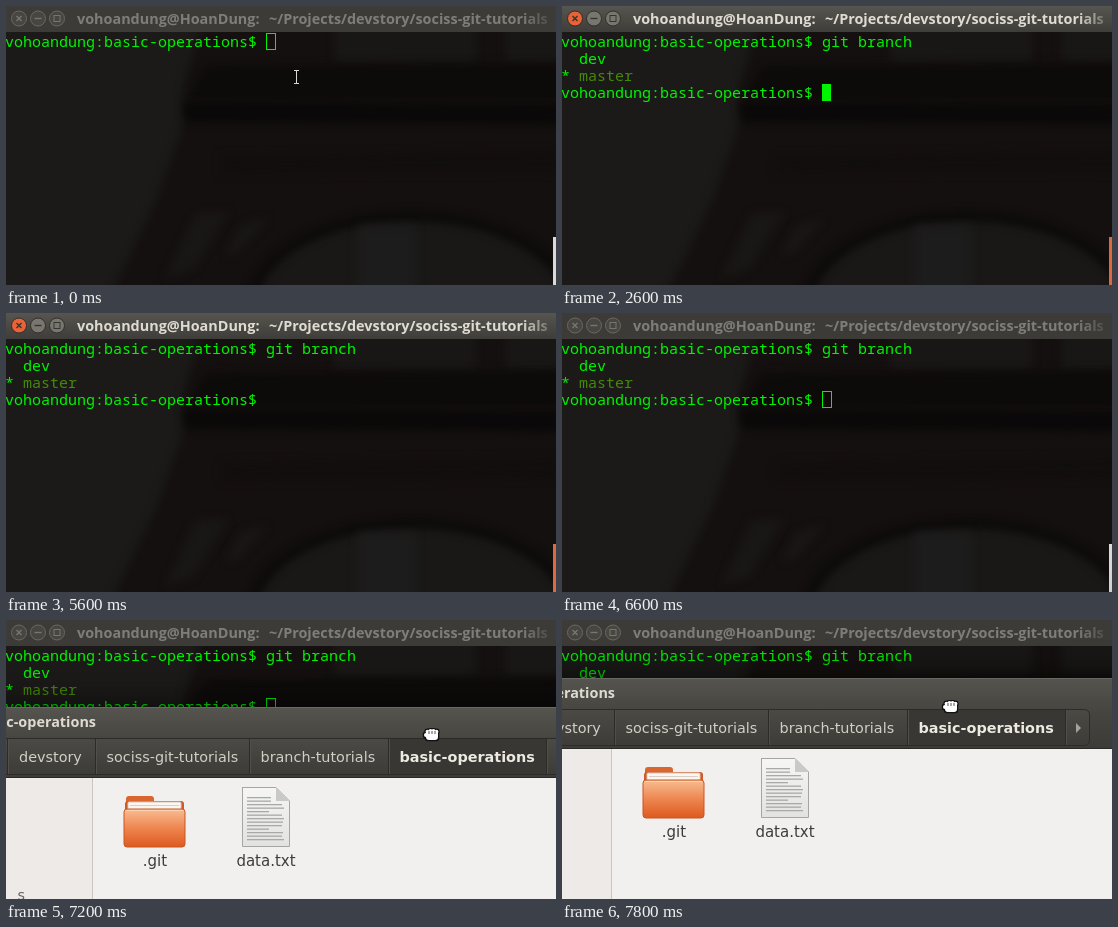
Write an HTML page with a canvas that moves like this. It is 550 by 279 pixels and loops after 8 s.

```html
<!DOCTYPE html>
<html>
<head>
<meta charset="utf-8">
<title>Terminal</title>
<style>
html, body { margin: 0; width: 550px; height: 279px; overflow: hidden; background: #1a1817; }
canvas { display: block; }
</style>
</head>
<body>
<canvas id="stage" width="550" height="279"></canvas>
<script>
const W = 550, H = 279, LOOP = 8000;
const ctx = document.getElementById('stage').getContext('2d');
const MONO = '15px "Noto Sans Mono", monospace';
const TITLE = '700 14.4px "Open Sans", sans-serif';
const LABEL = '14.4px "DejaVu Sans", sans-serif';
const FILE = '15px "DejaVu Sans", sans-serif';
const PROMPT = 'vohoandung:basic-operations$ ';
const COMMAND = 'git branch';
const GREEN = '#00f400';

// [time, characters typed]
const typing = [[0, 0], [1200, 1], [1400, 2], [1600, 4], [1800, 5], [2000, 8], [2200, 10]];
// [time, window x, window y, pointer offset x, pointer offset y]
const drag = [
  [6600, 575, 266, 517, 22], [6800, 25, 211, 517, 22], [7000, -17, 209, 517, 22],
  [7200, -100, 87, 525, 27], [7400, -112, 69, 525, 27],
  [7600, -134, 59, 525, 28], [7800, -137, 58, 525, 28]
];
const latest = (list, t) => list.filter(e => e[0] <= t).pop();

function rect(x, y, w, h, fill) {
  ctx.fillStyle = fill;
  ctx.fillRect(x, y, w, h);
}

function text(s, x, y, font, fill, align = 'left') {
  ctx.font = font;
  ctx.textAlign = align;
  ctx.fillStyle = fill;
  ctx.fillText(s, x, y);
}

function shape(points, fill, c = ctx) {
  c.beginPath();
  points.forEach(([x, y]) => c.lineTo(x, y));
  c.closePath();
  c.fillStyle = fill;
  c.fill();
}

function line(points, color, width = 1) {
  ctx.beginPath();
  points.forEach(([x, y], i) => i ? ctx.lineTo(x, y) : ctx.moveTo(x, y));
  ctx.strokeStyle = color;
  ctx.lineWidth = width;
  ctx.stroke();
}

function round(x, y, w, h, r, fill, stroke) {
  ctx.beginPath();
  ctx.roundRect(x, y, w, h, r);
  ctx.fillStyle = fill;
  ctx.fill();
  if (stroke) {
    ctx.strokeStyle = stroke;
    ctx.lineWidth = 1;
    ctx.stroke();
  }
}

function vertical(y0, y1, ...colors) {
  const g = ctx.createLinearGradient(0, y0, 0, y1);
  colors.forEach((c, i) => g.addColorStop(i / (colors.length - 1), c));
  return g;
}

// Dim, soft picture behind the terminal
const backdrop = document.createElement('canvas');
backdrop.width = W;
backdrop.height = H;
{
  const c = backdrop.getContext('2d');
  const box = (x, y, w, h, fill) => {
    c.fillStyle = fill;
    c.fillRect(x, y, w, h);
  };
  c.fillStyle = '#1b1a19';
  c.fillRect(0, 0, W, H);
  c.filter = 'blur(4px)';
  shape([[205, -10], [560, -10], [560, 290], [104, 290], [150, 195], [177, 120], [178, 76]], '#14100f', c);
  box(329, 10, 141, 46, '#191716');
  box(500, 10, 60, 46, '#191716');
  shape([[200, 60], [560, 58], [560, 92], [182, 92]], '#0d0a0a', c);
  shape([[176, 96], [560, 98], [560, 118], [180, 116]], '#0a0808', c);
  shape([[215, 150], [560, 145], [560, 165], [215, 168]], '#110e0d', c);
  shape([[190, 208], [222, 206], [188, 262], [160, 272]], '#191716', c);
  shape([[235, 220], [262, 212], [232, 246], [220, 248]], '#191716', c);
  c.beginPath();
  c.ellipse(405, 302, 160, 92, 0, 0, 7);
  c.fillStyle = '#191817';
  c.fill();
  c.lineWidth = 9;
  c.strokeStyle = '#0b0909';
  c.stroke();
  box(352, 220, 58, 70, '#1d1c1c');
}

function buttons(x, y, active) {
  const ink = active ? '#35342f' : '#79766f';
  for (let i = 0; i < 3; i++) {
    const cx = x + 19 * i;
    ctx.beginPath();
    ctx.arc(cx, y, 7.5, 0, 7);
    ctx.fillStyle = !active ? '#474640' : i ? '#79766f' : '#ec6237';
    ctx.fill();
    ctx.lineWidth = 1;
    ctx.strokeStyle = active ? '#302f2b' : '#6b6861';
    ctx.stroke();
    if (i === 0) {
      line([[cx - 2.5, y - 2.5], [cx + 2.5, y + 2.5]], ink, 1.4);
      line([[cx + 2.5, y - 2.5], [cx - 2.5, y + 2.5]], ink, 1.4);
    } else if (i === 1) {
      line([[cx - 3.5, y], [cx + 3.5, y]], ink, 1.4);
    } else {
      ctx.strokeStyle = ink;
      ctx.strokeRect(cx - 3, y - 3, 6, 6);
    }
  }
}

function terminalTitle(active) {
  rect(0, 0, W, 26, active ? vertical(0, 26, '#56554f', '#3e3d39') : '#3c3b37');
  buttons(13, 12.5, active);
  const rgb = active ? '223,219,210' : '128,125,120';
  const fade = ctx.createLinearGradient(515, 0, 549, 0);
  fade.addColorStop(0, `rgb(${rgb})`);
  fade.addColorStop(1, `rgba(${rgb},0.1)`);
  text('vohoandung@HoanDung:', 71, 18, TITLE, fade);
  text('~/Projects/devstory/sociss-git-tutorials', 263, 18, TITLE, fade);
}

const row = (s, n, color = GREEN) => text(s, -1, 41 + 17 * n, MONO, color);

function cursor(col, n, active) {
  const x = 9 * col - 1, y = 27 + 17 * n;
  if (active) return rect(x, y, 9, 17, GREEN);
  ctx.strokeStyle = GREEN;
  ctx.lineWidth = 1;
  ctx.strokeRect(x + 0.5, y + 0.5, 9, 16);
}

function terminal(t) {
  const active = t >= 400 && t < 6400;
  const done = t >= 2600;
  const typed = latest(typing, t)[1];
  ctx.drawImage(backdrop, 0, 0);
  terminalTitle(active);
  row(PROMPT + COMMAND.slice(0, typed), 0);
  if (done) {
    row('  dev', 1);
    row('*', 2);
    row('  master', 2, '#458a06');
    row(PROMPT, 3);
  }
  const blinkOff = done ? active && Math.floor((t - 2600) / 600) % 2 : t >= 1000 && t < 1200;
  if (!blinkOff) cursor(PROMPT.length + (done ? 0 : typed), done ? 3 : 0, active);
  if (t < 1200) {
    line([[290.5, 65], [290.5, 77]], '#d8d8d8');
    line([[288, 64.5], [293, 64.5]], '#d8d8d8');
    line([[288, 77.5], [293, 77.5]], '#d8d8d8');
  }
  rect(547, 231, 3, 48, active ? '#e0683e' : '#dcd9d6');
}

function folder(x, y) {
  round(x + 2, y, 28, 16, 3, '#d9662f');
  round(x + 1, y + 5, 59, 40, 3, '#cf5a25');
  round(x + 4, y + 6, 53, 16, 1, '#fbf6f1', '#dcc8bb');
  rect(x + 6, y + 9, 49, 1, '#d8cfc8');
  round(x, y + 13, 61, 38, 3, vertical(y + 13, y + 51, '#f8bd92', '#ee8650', '#dd5a20'), '#c9541f');
  line([[x + 2, y + 14.5], [x + 59, y + 14.5]], '#fbd3b5');
}

function page(x, y) {
  const edge = [[x + 0.5, y + 0.5], [x + 34, y + 0.5], [x + 47.5, y + 14], [x + 47.5, y + 59.5], [x + 0.5, y + 59.5], [x + 0.5, y]];
  shape(edge, vertical(y, y + 60, '#f6f6f5', '#e2e2e0'));
  line(edge, '#a5a5a2');
  shape([[x + 34, y + 1], [x + 47, y + 14], [x + 34, y + 14]], '#c9c9c7');
  for (let i = 0; i < 13; i++) {
    const width = i < 2 ? 24 : i % 5 === 4 ? 22 : 37 - i % 3;
    rect(x + 5, y + 10 + 3.5 * i, width, 1.3, '#a9a9a7');
  }
}

function chevron(x, y, dir, color) {
  line([[x - 3 * dir, y - 6], [x + 3 * dir, y], [x - 3 * dir, y + 6]], color, 2);
}

function fileWindow(x, y) {
  ctx.save();
  ctx.translate(x, y);
  ctx.shadowColor = 'rgba(0,0,0,0.8)';
  ctx.shadowBlur = 42;
  ctx.shadowOffsetY = 4;
  round(0, 0, 900, 600, [6, 6, 0, 0], '#3c3b37');
  ctx.shadowColor = 'transparent';

  round(0, 0, 900, 71, [6, 6, 0, 0], vertical(0, 71, '#55544e', '#45443f', '#3c3b37'));
  line([[5, 0.5], [895, 0.5]], '#6a6862');
  buttons(13, 14.5, true);
  text('basic-operations', 71, 20, TITLE, '#dfdbd2');

  const face = vertical(31, 67, '#4b4a45', '#3d3c38');
  round(6.5, 31.5, 63, 36, 5, face, '#2c2b28');
  round(79.5, 31.5, 585, 36, 5, face, '#2c2b28');
  rect(482, 32, 158, 35, '#383733');
  for (const sx of [38, 101, 189, 343, 482, 640]) {
    rect(sx, 32, 1, 35, '#2c2b28');
    rect(sx + 1, 32, 1, 35, '#504f49');
  }
  chevron(22, 50, -1, '#dfdbd2');
  chevron(54, 50, 1, '#98958d');
  shape([[92, 45], [87, 50], [92, 55]], '#dfdbd2');
  shape([[651, 45], [656, 50], [651, 55]], '#a5a29a');
  text('devstory', 113, 55, LABEL, '#d3cfc6');
  text('sociss-git-tutorials', 200.5, 55, LABEL, '#d3cfc6');
  text('branch-tutorials', 354.5, 55, LABEL, '#d3cfc6');
  text('basic-operations', 493.5, 55, '700 ' + LABEL, '#eeeae2');

  rect(0, 71, 187, 529, '#edeae8');
  rect(187, 71, 713, 529, '#f2f0ef');
  rect(186, 71, 1, 529, '#c9c5c1');
  rect(0, 70, 900, 1, '#2a2926');
  text('s', 119, 193, LABEL, '#67645f', 'right');
  folder(218, 89);
  page(336, 80);
  text('.git', 249, 159, FILE, '#3c3c3c', 'center');
  text('data.txt', 360, 159, FILE, '#3c3c3c', 'center');
  ctx.restore();
}

function hand(x, y) {
  for (const [grow, color] of [[1.2, '#111'], [0, '#fff']]) {
    ctx.fillStyle = color;
    for (let i = 0; i < 4; i++) {
      ctx.beginPath();
      ctx.arc(x - 3.5 + 3 * i, y - 3 + (i === 0 || i === 3 ? 0.7 : 0), 1.9 + grow, 0, 7);
      ctx.fill();
    }
    round(x - 7 - grow, y - 1 - grow, 5 + 2 * grow, 4 + 2 * grow, 2, color);
    round(x - 5 - grow, y - 3 - grow, 12 + 2 * grow, 9 + 2 * grow, 3, color);
  }
  for (let i = 0; i < 3; i++) line([[x - 2 + 3 * i, y - 3], [x - 2 + 3 * i, y]], '#555');
}

function frame() {
  const t = performance.now() % LOOP;
  terminal(t);
  const pose = latest(drag, t);
  if (pose) {
    const [, x, y, dx, dy] = pose;
    fileWindow(x, y);
    hand(x + dx, y + dy);
  }
  requestAnimationFrame(frame);
}
frame();
</script>
</body>
</html>
```
